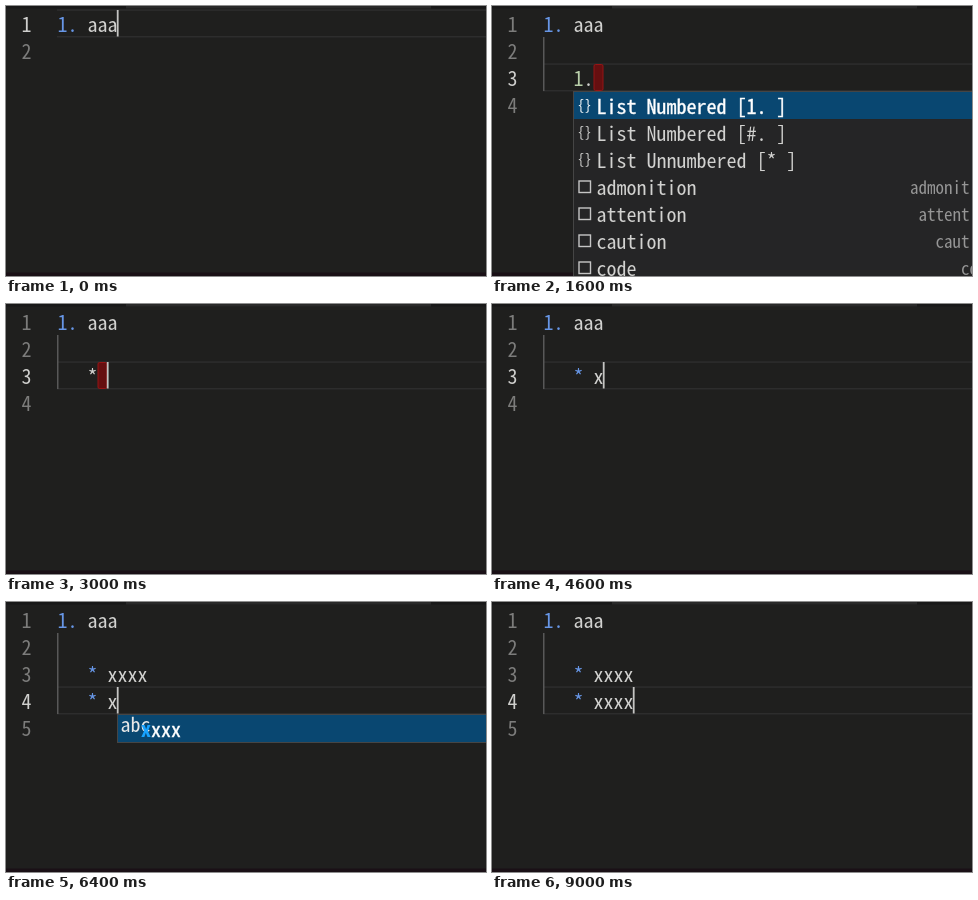
Animation, 480 px wide and 270 px high, one loop 9.33 s. Source, as an HTML page:

```html
<!DOCTYPE html>
<html lang="en">
<head>
<meta charset="utf-8">
<title>List editing</title>
<style>
  html, body { margin: 0; width: 100%; height: 100%; overflow: hidden; background: #1f1f1e; }
  svg { display: block; width: 480px; height: 270px; }
  text {
    font: 20px "Noto Sans Mono CJK JP", "Noto Sans Mono CJK SC", "Noto Sans Mono", monospace;
    white-space: pre;
  }
</style>
</head>
<body>
<svg id="stage" viewBox="0 0 480 270"></svg>
<script>
const LOOP = 9330, LINE = 27, CHAR = 10, LEFT = 51.5;
const BLUE = '#6796e6', GREEN = '#b9cfaa', PLAIN = '#d2d2d0';
const STRONG = 'stroke:#fff;stroke-width:.4px';
const stage = document.getElementById('stage');

// Each step changes only the named parts of the state before it.
const on = { caret: true }, off = { caret: false };
const steps = [
  [0, { lines: ['1. aaa', ''], row: 0, col: 6, menu: null, pick: 0, ...on }],
  [60, off],
  [530, { lines: ['1. aaa', '', ''], row: 1, col: 0, ...on }],
  [600, { lines: ['1. aaa', '2. ', ''], col: 3 }],
  [1060, off],
  [1130, { lines: ['1. aaa', '', '   1. ', ''], row: 2, col: 3, menu: 'snippets', ...on }],
  [1600, off],
  [2130, { pick: 1, ...on }],
  [2400, { pick: 2 }],
  [2600, off],
  [3000, { lines: ['1. aaa', '', '   * ', ''], col: 5, menu: null, ...on }],
  [3460, off],
  [4060, on],
  ...[4600, 4730, 4930, 5130].map((t, i) => [t, {
    lines: ['1. aaa', '', '   * ' + 'x'.repeat(i + 1), ''], col: 6 + i, ...on }]),
  [5660, off],
  [5930, { lines: ['1. aaa', '', '   * xxxx', '   ', ''], row: 3, col: 3, ...on }],
  [6000, { lines: ['1. aaa', '', '   * xxxx', '   * ', ''], col: 5 }],
  ...[6400, 6600, 6800, 7000].map((t, i) => [t, {
    lines: ['1. aaa', '', '   * xxxx', '   * ' + 'x'.repeat(i + 1), ''],
    col: 6 + i, menu: 'word', ...on }]),
  [7530, off],
  [8000, on],
  [8400, { menu: null }],
  [8460, off],
  [9000, on],
];

const rowY = row => 4 + LINE * row;
const colX = col => LEFT + CHAR * col;
const rect = (x, y, w, h, fill, more = '') =>
  `<rect x="${x}" y="${y}" width="${w}" height="${h}" fill="${fill}" ${more}/>`;
const text = (x, y, str, fill = PLAIN, style = '') =>
  `<text x="${x}" y="${y}" style="fill:${fill};${style}">${str}</text>`;

function codeLine(str, row) {
  const base = rowY(row) + 22;
  const [, indent, mark, rest] = str.match(/^(\s*)(\d+\.|\*)?(.*)$/);
  if (!mark) return '';
  const start = indent.length, end = start + mark.length;
  if (rest.trim()) {
    return text(colX(start), base, mark, BLUE) + text(colX(end), base, rest);
  }
  const space = rect(colX(end) + 0.5, rowY(row) + 0.5, 9, 26, '#650f10', 'rx="1.5" stroke="#961515"');
  if (mark === '*') return space + text(colX(start), base, mark);
  return space + text(colX(start), base, mark.slice(0, -1), GREEN) + text(colX(end - 1), base, '.');
}

function snippetMenu(pick) {
  const names = ['List Numbered [1. ]', 'List Numbered [#. ]', 'List Unnumbered [* ]',
    'admonition', 'attention', 'caution', 'code'];
  let out = rect(81.5, 85.5, 420, 200, '#252526', 'stroke="#454545"');
  names.forEach((name, i) => {
    const y = 86 + LINE * i, chosen = i === pick;
    const ink = chosen ? '#fff' : PLAIN;
    if (chosen) out += rect(82, y, 398, LINE, '#094771');
    if (i < 3) {
      out += text(85.5, y + 17.5, '{}', ink, 'font-size:14px');
    } else {
      out += rect(87, y + 8, 11.5, 11.5, 'none', 'stroke="#c5c5c5" stroke-width="1.4"');
      out += text(503 - 8.5 * name.length, y + 20.5, name, '#969696', 'font-size:17px');
    }
    out += text(104.5, y + 21.5, name, ink, chosen ? STRONG : '');
  });
  return out;
}

function wordMenu(col) {
  const x = colX(col), typed = col - 5;
  return rect(x, 112.5, 480, 28, '#094771', 'stroke="#454545"') +
    text(x + 3, 130, 'abc', '#e8e8e8', 'font:10px "Noto Sans",sans-serif;letter-spacing:-.5px') +
    text(x + 23.5, 134.5, 'x'.repeat(typed), '#18a3ff', 'font-weight:700') +
    text(x + 23.5 + CHAR * typed, 134.5, 'x'.repeat(4 - typed), '#fff', STRONG);
}

function draw({ lines, row, col, caret, menu, pick }) {
  let out = rect(0, 0, 480, 270, '#1f1f1e') +
    rect(0, 0, 480, 2.5, '#191919') + rect(120, 0, 305, 2.5, '#2a2a2a') +
    rect(0, 266.5, 480, 3.5, '#1a1016');
  for (const y of [rowY(row) - 0.7, rowY(row) + LINE - 1]) out += rect(51, y, 429, 1.5, '#2d2d2d');
  if (lines.length > 3) {
    out += rect(51, rowY(1), 1.5, LINE * (lines.length - 2), '#585858');
  }
  lines.forEach((str, i) => {
    out += text(15.5, rowY(i) + 22, i + 1, i === row ? '#cfcfcd' : '#7c7c7b');
    out += codeLine(str, i);
  });
  if (menu === 'snippets') out += snippetMenu(pick);
  if (menu === 'word') out += wordMenu(col);
  if (caret) out += rect(colX(col) - 0.7, rowY(row), 1.8, LINE - 0.5, '#c4c4c2');
  stage.innerHTML = out;
}

let state = {};
const states = steps.map(([, change]) => state = { ...state, ...change });

let shown = -1;
function tick() {
  const t = performance.now() % LOOP;
  const now = steps.filter(([start]) => start <= t).length - 1;
  if (now !== shown) draw(states[shown = now]);
  requestAnimationFrame(tick);
}
tick();
</script>
</body>
</html>
```
